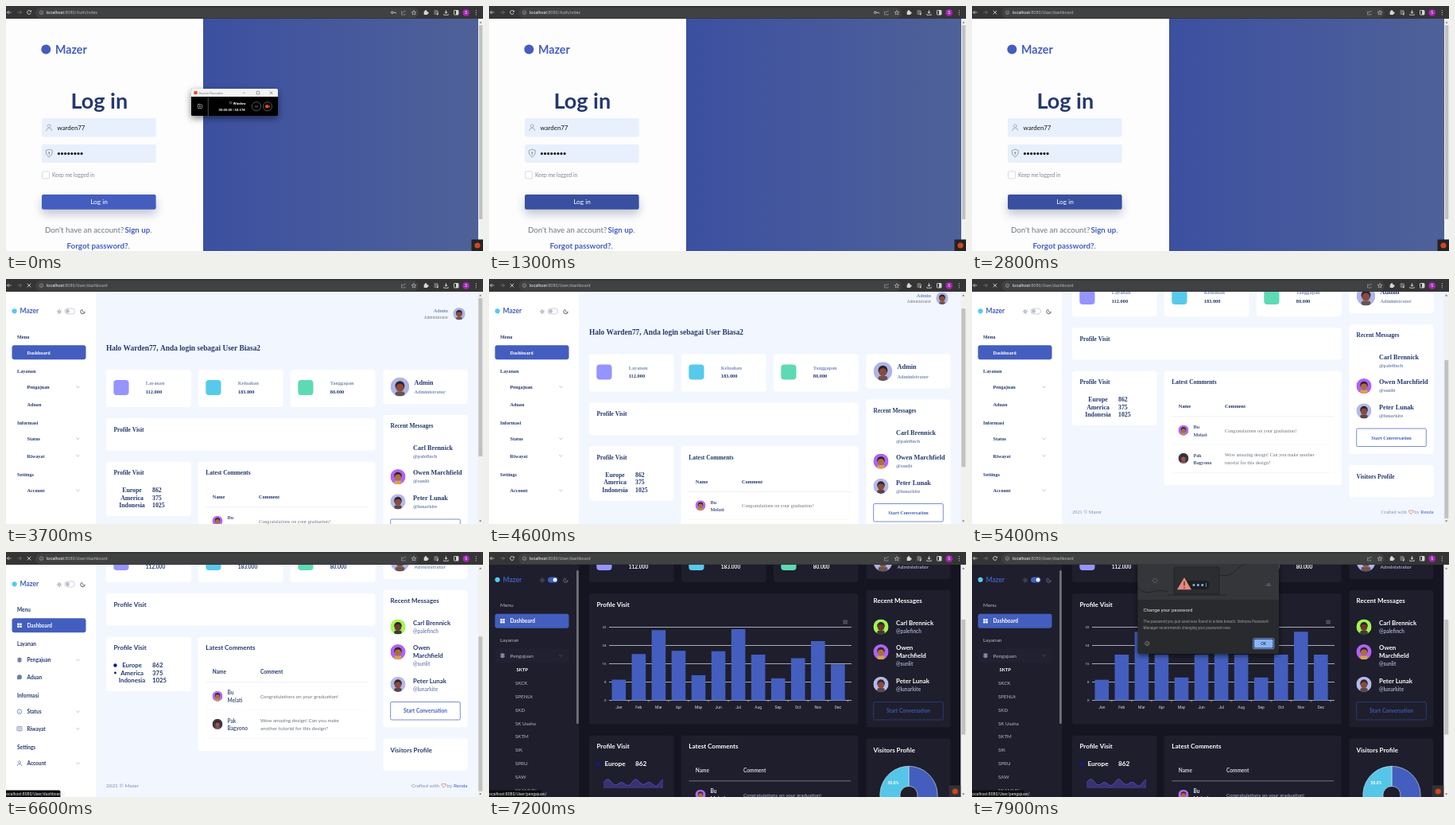
An HTML page with a canvas for the animation above (8 s loop, 600 px wide and 308 px high).

```html
<!DOCTYPE html>
<html lang="en">
<head>
<meta charset="utf-8">
<title>Login and dashboard</title>
<style>
html, body { margin: 0; width: 100%; height: 100%; overflow: hidden; background: #fff; }
canvas { display: block; width: 100vw; height: 100vh; }
</style>
</head>
<body>
<canvas id="stage"></canvas>
<script>
const W = 600, H = 308, LOOP = 8000, STEP = 100;
const SANS = 'Lato, "Open Sans", sans-serif';
const SERIF = '"Liberation Serif", serif';
const UI = 'Roboto, sans-serif';
const BLUE = '#435ebe', CYAN = '#57caeb';

// Moments of change, in ms
const RECORDER_OFF = 300, HOVER = 900, SUBMIT = 1400, DASH = 3700,
      IMAGE = 5700, FONTS = 6200, STATUS = 6400, READY = 6700, MENU = 6800, DIALOG = 7500;
const SCROLL = [[4500, 0], [4900, 78], [5300, 114], [6200, 114], [6400, 123]];

const canvas = document.getElementById('stage');
const ctx = canvas.getContext('2d');
const clamp = (v, a = 0, b = 1) => Math.min(b, Math.max(a, v));
const ease = p => p * p * (3 - 2 * p);
let font = SANS;

function track(keys, t) {
  if (t <= keys[0][0]) return keys[0][1];
  for (let i = 1; i < keys.length; i++) {
    const [a, u] = keys[i - 1], [b, v] = keys[i];
    if (t <= b) return u + (v - u) * (t - a) / (b - a);
  }
  return keys[keys.length - 1][1];
}
function rect(x, y, x2, y2, fill, r = 0) {
  ctx.beginPath();
  ctx.roundRect(x, y, x2 - x, y2 - y, r);
  ctx.fillStyle = fill;
  ctx.fill();
}
function frame(x, y, x2, y2, color, r = 0, w = 0.7) {
  ctx.beginPath();
  ctx.roundRect(x, y, x2 - x, y2 - y, r);
  ctx.strokeStyle = color;
  ctx.lineWidth = w;
  ctx.stroke();
}
function disc(x, y, r, fill) {
  ctx.beginPath();
  ctx.arc(x, y, r, 0, 7);
  ctx.fillStyle = fill;
  ctx.fill();
}
function ring(x, y, r, color, w = 0.7, a = 0, b = 2 * Math.PI) {
  ctx.beginPath();
  ctx.arc(x, y, r, a, b);
  ctx.strokeStyle = color;
  ctx.lineWidth = w;
  ctx.stroke();
}
function line(color, w, ...p) {
  ctx.beginPath();
  for (let i = 0; i < p.length; i += 2) ctx.lineTo(p[i], p[i + 1]);
  ctx.strokeStyle = color;
  ctx.lineWidth = w;
  ctx.stroke();
}
function poly(color, ...p) {
  ctx.beginPath();
  for (let i = 0; i < p.length; i += 2) ctx.lineTo(p[i], p[i + 1]);
  ctx.fillStyle = color;
  ctx.fill();
}
function text(s, x, y, size, color, bold = false, align = 'left', family = font) {
  ctx.font = `${bold ? 700 : 400} ${size}px ${family}`;
  ctx.textAlign = align;
  ctx.fillStyle = color;
  ctx.fillText(s, x, y);
  return ctx.measureText(s).width;
}
function shadow(color, blur, dy, draw) {
  ctx.save();
  ctx.shadowColor = color;
  ctx.shadowBlur = blur * canvas.width / W;
  ctx.shadowOffsetY = dy * canvas.height / H;
  draw();
  ctx.restore();
}
function person(x, y, s, color) {
  ring(x, y - 1.6 * s, 1.7 * s, color);
  ring(x, y + 3.8 * s, 3.1 * s, color, 0.7, Math.PI, 2 * Math.PI);
}
function avatar(x, y, r, bg, skin, shirt) {
  ctx.save();
  ctx.beginPath();
  ctx.arc(x, y, r, 0, 7);
  ctx.clip();
  rect(x - r, y - r, x + r, y + r, bg);
  rect(x - r * .5, y + r * .5, x + r * .5, y + r, shirt, r * .25);
  disc(x, y - r * .12, r * .5, '#33232b');
  disc(x, y + r * .1, r * .42, skin);
  ctx.restore();
}

function browser(t) {
  const busy = t >= SUBMIT && t < READY;
  const fg = '#d4d6d9';
  rect(0, 0, W, 16, '#353536');
  rect(37, 2, 519, 15, '#404142', 6.5);
  line(fg, 0.8, 6.5, 8, 1.5, 8); line(fg, 0.8, 3.7, 5.8, 1.5, 8, 3.7, 10.2);
  line('#76787c', 0.8, 14.5, 8, 19.5, 8); line('#76787c', 0.8, 17.3, 5.8, 19.5, 8, 17.3, 10.2);
  if (busy) {
    line(fg, 0.9, 26.7, 5.8, 31.2, 10.3);
    line(fg, 0.9, 31.2, 5.8, 26.7, 10.3);
  } else {
    ring(29, 8, 2.4, fg, 0.9, 0.4, 5.6);
    poly(fg, 29.8, 7.6, 32, 7.6, 32, 5.2);
  }
  ring(44.5, 8.2, 2.2, '#b4b8bc', 0.6);
  line('#b4b8bc', 0.6, 44.5, 7.8, 44.5, 9.5);
  const w = text('localhost', 51, 10.2, 5.4, '#f5f6f8', false, 'left', UI);
  text(t < SUBMIT ? ':8080/Auth/index' : ':8080/User/dashboard', 51 + w, 10.2, 5.4, '#b0b3b7', false, 'left', UI);
  if (t < SUBMIT) {
    ring(485.8, 8.2, 1.3, fg, 0.8);
    line(fg, 0.8, 487, 8.2, 490.3, 8.2, 490.3, 9.6);
  }
  line('#a5a8ac', 0.6, 499, 7, 497.5, 7, 497.5, 11, 502, 11, 502, 9.5);
  line('#a5a8ac', 0.6, 499, 9, 500, 7, 503, 6.2);
  ctx.beginPath();
  for (let i = 0; i < 10; i++) {
    const a = i * Math.PI / 5 - Math.PI / 2, r = i % 2 ? 1.3 : 3;
    ctx.lineTo(513 + r * Math.cos(a), 8.5 + r * Math.sin(a));
  }
  ctx.closePath();
  ctx.strokeStyle = fg; ctx.lineWidth = 0.6; ctx.stroke();
  rect(525.7, 6.4, 530.2, 11, fg, 0.6); disc(528, 6.2, 1.1, fg); disc(530.6, 8.7, 1.1, fg);
  for (const y of [6, 8, 10]) line(fg, 0.7, 538.5, y, y > 9 ? 541 : 543, y);
  disc(542.6, 10.3, 1.1, fg); line(fg, 0.6, 543.5, 10, 543.5, 6.5);
  line(fg, 0.8, 553.5, 5, 553.5, 9); poly(fg, 551.4, 7.6, 555.6, 7.6, 553.5, 9.8);
  line(fg, 0.8, 550.8, 9.8, 550.8, 11.3, 556.2, 11.3, 556.2, 9.8);
  frame(563.5, 5.5, 569, 11, fg, 0.6, 0.9); rect(566, 5.5, 569, 11, fg);
  disc(578.7, 8.3, 4.4, '#a526b5');
  text('S', 578.7, 10, 4.8, '#fff', false, 'center', UI);
  for (const y of [5.8, 8.3, 10.8]) disc(591.3, y, 0.65, fg);
}

function scrollbar(x, top, bottom) {
  rect(x, 16, W, H, '#f1f1f1');
  rect(x + 1, top, W - 0.7, bottom, '#c1c1c1');
  const m = (x + W) / 2;
  poly('#707070', m - 1.6, 21.4, m + 1.6, 21.4, m, 19.4);
  poly('#707070', m - 1.6, 303.6, m + 1.6, 303.6, m, 305.6);
}
function debugTab(x, bg) {
  rect(x, 293.5, x + 14.5, H, bg);
  disc(x + 7.5, 301, 3.6, '#d0461a');
}

function login(t) {
  font = SANS;
  rect(0, 16, 249, H, '#fdfdfe');
  const g = ctx.createLinearGradient(248, 0, 594, 0);
  g.addColorStop(0, '#3c50a1');
  g.addColorStop(1, '#4f6198');
  rect(248, 16, 594, H, g);
  disc(50.3, 54.5, 6, BLUE);
  text('Mazer', 62, 60, 14.2, BLUE, true);
  text('Log in', 81.5, 129, 27, '#25396f', true);
  rect(45, 141, 188.8, 164.5, '#e8f0fe', 2);
  rect(45, 174, 188.8, 197, '#e8f0fe', 2);
  person(54.3, 152.7, 1.15, '#8d96a8');
  text('warden77', 64.5, 155.7, 7.9, '#151515');
  line('#858d9c', 0.8, 54.3, 180.2, 58.3, 181.6, 58, 186, 54.3, 190.2, 50.6, 186, 50.3, 181.6, 54.3, 180.2);
  disc(54.3, 184.2, 1, '#858d9c'); line('#858d9c', 0.8, 54.3, 184, 54.3, 187.3);
  for (let i = 0; i < 8; i++) disc(66.4 + i * 4.1, 185.6, 1.55, '#111');
  rect(45.5, 208, 54.5, 217, '#fff', 1.5);
  frame(45.5, 208, 54.5, 217, '#c4cad4', 1.5);
  text('Keep me logged in', 58, 214.6, 6.6, '#7e8594');
  const fill = t < HOVER ? BLUE : '#394f9f';
  shadow('rgba(40,50,90,.28)', 12, 6, () => rect(45, 237, 188.6, 255.7, fill, 2));
  text('Log in', 117, 248.9, 8.3, '#fff', false, 'center');
  text("Don't have an account? ", 49, 285, 9.7, '#6c757d');
  let w = text('Sign up', 149.5, 285, 9.7, BLUE, true);
  text('.', 149.5 + w, 285, 9.7, '#6c757d');
  w = text('Forgot password?', 76.5, 305, 9.8, BLUE, true);
  text('.', 76.5 + w, 305, 9.8, '#6c757d');
  scrollbar(594, 24, 268);
  debugTab(585.5, '#232326');
  if (t < RECORDER_OFF) recorder();
}

function recorder() {
  shadow('rgba(0,0,0,.5)', 8, 3, () => rect(233, 104, 342, 138, '#000', 1.5));
  rect(233, 104, 342, 114, '#f3f3f5', [1.5, 1.5, 0, 0]);
  rect(236.3, 107, 240.7, 111, '#e8502c', 0.5);
  text('Screen Recorder', 242.5, 110.8, 4.2, '#777', false, 'left', UI);
  line('#888', 0.6, 297.5, 109.2, 301, 109.2);
  frame(315.2, 107.3, 318.8, 110.9, '#666', 0, 0.6);
  line('#555', 0.6, 331.8, 107.4, 335.2, 110.8); line('#555', 0.6, 335.2, 107.4, 331.8, 110.8);
  line('#777', 0.7, 254.3, 115, 254.3, 138);
  frame(241.3, 124, 246.7, 128.5, '#bbb', 0.5, 0.7); line('#bbb', 0.7, 241.3, 123.3, 243.5, 123.3);
  poly('#bbb', 243.3, 125, 243.3, 127.5, 245.3, 126.2);
  frame(281.3, 120.4, 283.7, 122.8, '#bbb', 0, 0.5);
  text('Window', 285.8, 123.6, 4.4, '#fff', true, 'left', UI);
  text('00:00:00 | 58.57K', 301, 132.4, 4.2, '#eee', true, 'right', UI);
  ring(315, 126.2, 5.6, '#777'); ring(329, 126.2, 5.6, '#777');
  line('#999', 0.7, 314, 125, 314, 127.5); line('#999', 0.7, 316, 125, 316, 127.5);
  rect(326.3, 124.3, 330.3, 128.3, '#e8502c', 0.7);
  poly('#e8502c', 330.3, 126.2, 332, 124.8, 332, 127.7);
}

function navIcon(kind, y, c) {
  const x = 17;
  if (kind === 0) for (const dx of [-2.8, .3]) for (const dy of [-2.8, .3]) rect(x + dx, y + dy, x + dx + 2.5, y + dy + 2.5, c, 0.4);
  if (kind === 1) for (const d of [1.6, 0, -1.6]) poly(c, x - 3.2, y + d, x, y + d - 1.6, x + 3.2, y + d, x, y + d + 1.6);
  if (kind === 2) { disc(x, y, 3, c); poly(c, x - 3, y + 3, x - 2.8, y, x, y + 2.8); }
  if (kind === 3) { ring(x, y, 2.8, c, 0.8); line(c, 0.8, x, y - 0.4, x, y + 1.5); }
  if (kind === 4) { frame(x - 3, y - 2.6, x + 3, y + 2.6, c, 0.5, 0.8); for (const d of [-1, 0.8]) line(c, 0.7, x - 1.8, y + d, x + 1.8, y + d); }
  if (kind === 5) person(x, y, 0.9, c);
}

function sidebar(t, dark) {
  const open = ease(clamp((t - MENU) / 300));
  const sans = t >= FONTS;
  const ink = dark ? '#b9bacd' : '#25396f';
  const size = sans ? 6.5 : 6.2;
  const drop = open * 169;
  rect(0, 16, 113, H, dark ? '#1e1e2d' : '#fff');
  ctx.save();
  ctx.translate(0, -5.5 * open);
  disc(10.6, 40.3, 3.1, CYAN);
  text('Mazer', 17.5, 43.2, 8.5, BLUE, true, 'left', SANS);
  const soft = dark ? '#77798c' : '#6d7690';
  ring(67, 41, 1.4, soft);
  for (let a = 0; a < 6.2; a += Math.PI / 4) {
    const u = Math.cos(a), v = Math.sin(a);
    line(soft, 0.6, 67 + u * 2.3, 41 + v * 2.3, 67 + u * 3.3, 41 + v * 3.3);
  }
  rect(74, 37, 86.5, 44, dark ? BLUE : '#fff', 3.5);
  if (!dark) frame(74, 37, 86.5, 44, '#b9bec9', 3.5);
  disc(dark ? 83 : 77.5, 40.5, 2.4, dark ? '#fff' : '#b9bec9');
  ring(96.5, 41, 2.8, dark ? soft : '#3c4254', 0.8, 0.2, 4.4);
  ring(98.2, 39.6, 2.2, dark ? soft : '#3c4254', 0.7, 0.9, 3.7);

  for (const [s, y] of [['Menu', 74.5], ['Layanan', 118], ['Informasi', 183], ['Settings', 248]])
    text(s, 14, y + (y > 150 ? drop : 0), size, ink, !dark);
  rect(7.5, 83.2, 100.5, 101.2, BLUE, 3);
  if (dark) rect(7.5, 127, 100.5, 145, '#212131', 3);
  const items = [['Dashboard', 94.5], ['Pengajuan', 138], ['Aduan', 159.5], ['Status', 203], ['Riwayat', 224.5], ['Account', 268]];
  items.forEach(([s, base], i) => {
    const y = base + (i > 1 ? drop : 0);
    text(s, 26.5, y, size, i ? ink : '#fff', !dark || !i);
    if (sans) navIcon(i, y - 2.3, i ? (dark ? '#8487a3' : '#6f7cab') : '#fff');
    if (i && i !== 2) line(dark ? '#5d6078' : '#9aa4bf', 0.7, 88.4, y - 3.2, 90.4, y - 1.4, 92.4, y - 3.2);
  });
  if (open > 0) {
    ctx.beginPath();
    ctx.rect(0, 146, 113, drop);
    ctx.clip();
    ['SKTP', 'SKCK', 'SPENUt', 'SKD', 'SK Usaha', 'SKTM', 'SIK', 'SPRU', 'SAW', 'SKAMUN'].forEach((s, i) =>
      text(s, i ? 33 : 34.5, 155.4 + i * 16.9, i ? 6.2 : 5.9, i ? ink : '#fff', !i));
  }
  ctx.restore();
  if (dark) rect(110, 23, 112.8, 216, '#6f7078', 1);
}

function chart(t) {
  const data = [9, 20, 30, 20, 10, 20, 30, 20, 10, 20, 30, 20];
  const left = [.05, .1, .13, .31, .43, .53, .59, .63, .66, .69, .725, .765];
  const months = 'Jan Feb Mar Apr May Jun Jul Aug Sep Oct Nov Dec'.split(' ');
  for (let i = 0; i < 5; i++) {
    const y = 186.5 - i * 23;
    line('#d0d0d7', 0.8, 151, y, 456, y);
    text(i * 8, 147.5, y + 1.4, 4.4, '#d5d5de', false, 'right', UI);
  }
  data.forEach((v, i) => {
    const q = clamp(left[i] - (t - 7200) / 500);
    const h = v * 2.875 * (1 + q * q * (1.70158 - 2.70158 * q));
    const x = 163.3 + i * 25.05;
    rect(x - 8.8, 186.5 - h, x + 8.8, 186.5, BLUE);
    line('#d0d0d7', 0.6, x + 12.5, 186.5, x + 12.5, 188.5);
    text(months[i], x, 196.7, 4.9, '#dcdce4', false, 'center', UI);
  });
  for (const d of [-1.8, 0, 1.8]) line('#7d7e8e', 0.8, 445.3, 88 + d, 451, 88 + d);
}
function sparkline() {
  const top = x => 290.3 - 2.6 * Math.sin((x - 145) * .36) - 2 * Math.sin((x - 140) * .17);
  ctx.beginPath();
  for (let x = 144; x <= 219; x++) ctx.lineTo(x, top(x));
  ctx.strokeStyle = '#5350c9'; ctx.lineWidth = 0.9; ctx.stroke();
  ctx.lineTo(219, 297); ctx.lineTo(144, 297);
  ctx.fillStyle = 'rgba(83,70,180,.5)'; ctx.fill();
}
function donut(t) {
  const end = clamp((t - READY) / 400) * Math.PI * 2, cut = Math.PI * 1.4;
  const slice = (a, b, c) => {
    if (b <= a) return;
    ctx.beginPath();
    ctx.arc(528, 305.5, 36.2, a - Math.PI / 2, b - Math.PI / 2);
    ctx.arc(528, 305.5, 11, b - Math.PI / 2, a - Math.PI / 2, true);
    ctx.closePath();
    ctx.fillStyle = c; ctx.fill();
    ctx.strokeStyle = '#e6e8f2'; ctx.lineWidth = 0.6; ctx.stroke();
  };
  slice(0, Math.min(end, cut), BLUE);
  slice(cut, end, '#55c6e8');
  if (end > 6.2) text('30.0%', 508.5, 291.8, 5, '#fff', true, 'center', UI);
}

function dashboard(t) {
  const dark = t >= READY, sans = t >= FONTS;
  font = sans ? SANS : SERIF;
  const ink = dark ? '#fff' : '#25396f', mute = dark ? '#a3a6c4' : '#7c8db5', body = dark ? '#b8b9cc' : '#6c757d';
  const card = (x, y, x2, y2) => rect(x, y, x2, y2, dark ? '#1e1e2d' : '#fff', 3.5);
  const title = sans ? 8 : 7.5, name = sans ? 7.9 : 8.2, small = sans ? 6.5 : 6.2;
  const grow = dark ? 124 : 0, wrap = sans ? 9.5 : 0;
  rect(0, 16, W, H, dark ? '#151521' : '#f2f7ff');
  ctx.save();
  ctx.translate(0, -track(SCROLL, t));

  text('Admin', 556, 42, 6.2, mute, true, 'right');
  text('Administrator', 556, 49.6, 5.4, body, false, 'right');
  avatar(570, 43.8, 7.7, '#adb4e6', '#8a4b3c', '#6a5450');
  text('Halo Warden77, Anda login sebagai User Biasa2', 126, 89.6, 9.4, ink, true);

  [['Layanan', '112.000', '#9694ff'], ['Keluahan', '183.000', CYAN], ['Tanggapan', '80.000', '#5ddab4']].forEach(([s, n, c], i) => {
    const x = 126 + i * 116;
    card(x, 114, x + 106.6, 161);
    rect(x + 9.3, 127, x + 28.5, 146, c, 4);
    text(s, x + 49.7, 133, 6.3, mute, true);
    text(n, x + 49.7, 143.8, sans ? 6.6 : 6.4, ink, true);
  });
  card(474.5, 114, 580.5, 157);
  avatar(495.5, 135.6, 11.8, '#adb4e6', '#8a4b3c', '#6a5450');
  text('Admin', 513.5, 132.6, name, ink, true);
  text('Administrator', 513.5, 144, 6.4, mute, true);

  card(126, 175.3, 464.6, 215.6 + grow);
  text('Profile Visit', 135.4, 191.8, title, ink, true);

  card(474.5, 171, 580.5, 333.8 + wrap);
  text('Recent Messages', 483.5, 187.3, title, ink, true);
  const mate = (s, tag, y, extra) => {
    const parts = extra ? s.split(' ') : [s];
    parts.forEach((p, i) => text(p, 512, y + i * 9.5, name, ink, true));
    text(tag, 512, y + extra + 10, small, mute, true);
  };
  mate('Carl Brennick', '@palefinch', 215.3, 0);
  mate('Owen Marchfield', '@sunlit', 246.4, wrap);
  mate('Peter Lunak', '@lunarkite', 278 + wrap, 0);
  if (t >= IMAGE) avatar(493, 217, 9.6, '#a2f551', '#6b3a2b', '#3f3a30');
  avatar(493, 248.6, 9.6, '#b062f5', '#a8703c', '#d9a24a');
  avatar(493, 279.8 + wrap, 9.6, '#b3baea', '#8a4b3c', '#5a4648');
  frame(483.7, 302 + wrap, 571.3, 324.5 + wrap, dark ? '#34468f' : BLUE, 1.5);
  text('Start Conversation', 527.5, 315.7 + wrap, sans ? 6.6 : 6.2, dark ? '#3f57b0' : BLUE, true, 'center');

  const vis = 348 + wrap;
  card(474.5, vis, 580.5, vis + (dark ? 150 : 40.5));
  text('Visitors Profile', 483.5, vis + 17, title, ink, true);

  ctx.save();
  ctx.translate(0, grow);
  card(126, 229.7, 232.6, 298 + grow);
  text('Profile Visit', 135.4, 246, title, ink, true);
  const rows = [['Europe', '862', 2.2], ['America', '375', 1.4], ['Indonesia', '1025', 0]];
  rows.slice(0, dark ? 1 : 3).forEach(([s, n, r], i) => {
    const y = 268.3 + i * 9.5;
    text(s, 158.5, y, dark ? 8.3 : 7.8, ink, true, 'center');
    text(n, 184, y, dark ? 8.3 : 7.8, ink, true);
    if (sans && r) disc(137.4, y - 2.8, r, '#1414a0');
  });

  card(241.6, 229.7, 464.6, 373);
  text('Latest Comments', 251.3, 246, title, ink, true);
  const cx = sans ? 320 : 318;
  text('Name', 259.8, 276, small, dark ? '#d5d6e2' : ink, true);
  text('Comment', cx, 276, small, dark ? '#d5d6e2' : ink, true);
  line(dark ? '#a9aab8' : '#dfe4ee', 0.6, 251.5, 286.8, 455, 286.8);
  line('#edf0f5', 0.5, 251.5, 322, 455, 322);
  line('#edf0f5', 0.5, 251.5, 357.5, 455, 357.5);
  avatar(266, 304.2, 6.5, '#b06af0', '#a8703c', '#c98a3a');
  avatar(266, 339.3, 6.5, '#3a3a46', '#a35244', '#77505a');
  [['Bu', 'Melati'], ['Pak', 'Bagyono']].forEach((who, i) => who.forEach((s, k) =>
    text(s, 278.5, 302.2 + i * 35.3 + k * 9.4, small, dark ? '#e4e4ee' : '#48577f', true)));
  text('Congratulations on your graduation!', cx, 306.6, 6.2, body);
  const reply = sans ? ['Wow amazing design! Can you make', 'another tutorial for this design?']
                     : ['Wow amazing design! Can you make another', 'tutorial for this design?'];
  reply.forEach((s, i) => text(s, cx, 337.3 + i * 9.6, 6.2, body));
  ctx.restore();

  if (!dark) {
    const y = 409 + wrap;
    text('2021 © Mazer', 126, y, 6.4, mute);
    let x = 580.5 - text('Renda', 580.5, y, 6.4, BLUE, false, 'right');
    x -= text('by ', x, y, 6.4, mute, false, 'right');
    const hx = x - 4, hy = y - 2;
    ctx.beginPath();
    ctx.moveTo(hx, hy + 2.4);
    ctx.bezierCurveTo(hx - 5, hy - 1, hx - 1.8, hy - 4, hx, hy - 1.2);
    ctx.bezierCurveTo(hx + 1.8, hy - 4, hx + 5, hy - 1, hx, hy + 2.4);
    ctx.strokeStyle = '#dc5563'; ctx.lineWidth = 0.7; ctx.stroke();
    text('Crafted with', x - 9.5, y, 6.4, mute, false, 'right');
  }
  ctx.restore();

  if (dark) { chart(t); sparkline(); donut(t); }
  sidebar(t, dark);
  const s = track(SCROLL, t), page = dark ? 558 : 405 + wrap;
  const top = 24 + 277 * s / page;
  scrollbar(593.3, top, top + 277 * 291 / page);
  if (dark) debugTab(578.8, '#313138');
  if (t >= STATUS) {
    rect(0, 299.5, dark ? 66 : 68.5, H, '#0d0d0f', [0, 2, 0, 0]);
    text('localhost:8080/User/' + (t >= 7000 ? 'pengajuan/' : 'dashboard#'), -1.2, 305.6, 5.1, '#e4e6e9', false, 'left', UI);
  }
}

function dialog() {
  shadow('rgba(0,0,0,.6)', 6, 2, () => rect(208.5, 14, 386, 128, '#292a2d', 2));
  const dim = '#1e1f21', gear = '#55585c';
  rect(208.5, 16, 386, 60, '#343639');
  ctx.beginPath();
  ctx.moveTo(208.5, 45);
  ctx.bezierCurveTo(222, 58, 230, 44, 246, 50);
  ctx.moveTo(312, 29);
  ctx.bezierCurveTo(330, 32, 328, 22, 342, 16);
  ctx.strokeStyle = dim; ctx.lineWidth = 0.8; ctx.stroke();
  rect(254, 19, 311, 53, '#2c2d30', 2);
  frame(254, 19, 311, 53, dim, 2);
  line(dim, 0.8, 246, 54, 320, 54);
  ring(230, 36, 2.4, gear, 0.9);
  for (let a = 0; a < 6.2; a += Math.PI / 3) line(gear, 0.8, 230 + 2.6 * Math.cos(a), 36 + 2.6 * Math.sin(a), 230 + 4 * Math.cos(a), 36 + 4 * Math.sin(a));
  disc(373, 41, 2, gear);
  line(gear, 1.2, 369.5, 42.2, 376.5, 42.2);
  rect(268, 36, 299, 47, '#1d1e20', 5.5);
  for (let i = 0; i < 3; i++) disc(279 + i * 5.4, 41.5, 1.5, '#8ab4f8');
  line('#8ab4f8', 0.7, 294.5, 39, 294.5, 44);
  poly('#e58a80', 267, 32, 276, 47.3, 258, 47.3);
  line('#3a2020', 1.2, 267, 37, 267, 42.5); disc(267, 45, 0.8, '#3a2020');
  text('Change your password', 215.5, 75.4, 6.1, '#e8eaed', false, 'left', UI);
  text('The password you just used was found in a data breach. Velmora Password', 215.5, 89.2, 4.7, '#9aa0a6', false, 'left', UI);
  text('Manager recommends changing your password now.', 215.5, 97, 4.7, '#9aa0a6', false, 'left', UI);
  ring(220.3, 115, 2.5, '#a8acb1', 0.6); line('#a8acb1', 0.6, 220.3, 114.4, 220.3, 116.4);
  frame(353.7, 108.5, 379.8, 121.7, '#5b82c4', 2, 1.2);
  rect(355, 109.8, 378.5, 120.4, '#8ab4f8', 1.5);
  text('OK', 366.7, 117, 5.2, '#202124', false, 'center', UI);
}

function draw(t) {
  const scale = window.devicePixelRatio || 1;
  const w = Math.round(W * scale), h = Math.round(H * scale);
  if (canvas.width !== w || canvas.height !== h) { canvas.width = w; canvas.height = h; }
  ctx.setTransform(w / W, 0, 0, h / H, 0, 0);
  ctx.clearRect(0, 0, W, H);
  if (t < DASH) login(t); else dashboard(t);
  browser(t);
  if (t >= DIALOG) {
    ctx.save();
    ctx.beginPath();
    ctx.rect(0, 16, W, H);
    ctx.clip();
    dialog();
    ctx.restore();
  }
}

const start = performance.now();
function tick(now) {
  const t = Math.max(0, now - start) % LOOP;
  draw(Math.floor(t / STEP) * STEP);
  requestAnimationFrame(tick);
}
draw(0);
requestAnimationFrame(tick);
</script>
</body>
</html>
```
